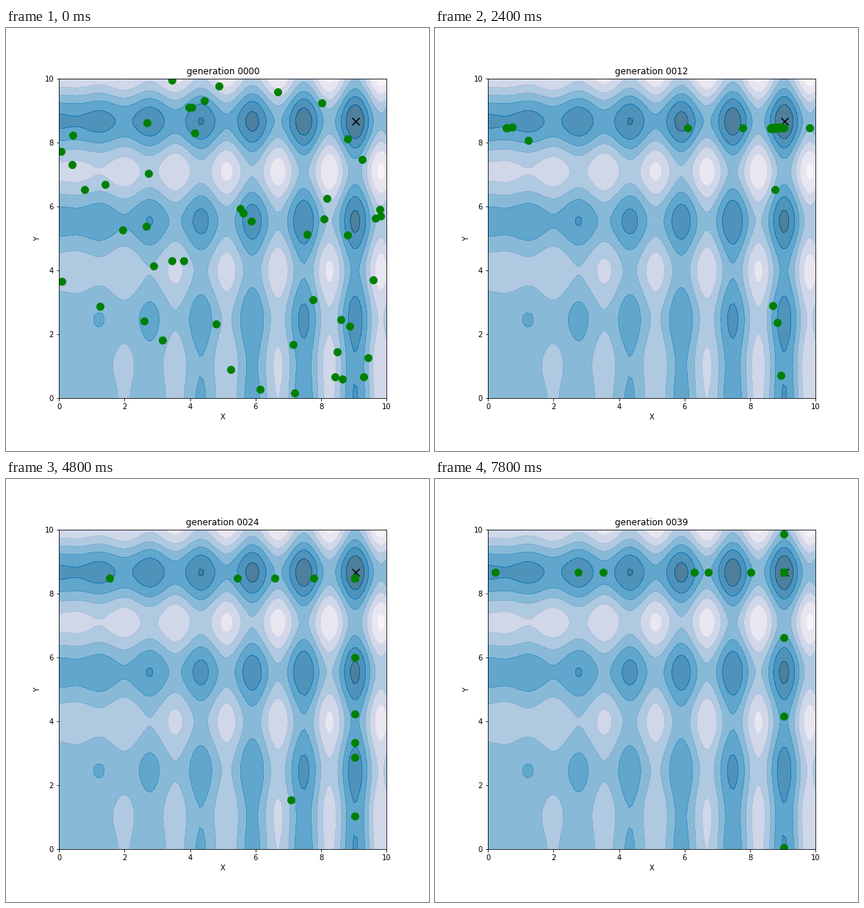
These frames come from a looping animation (576x576 px, 8 s). A matplotlib script:

```python
import numpy as np
import matplotlib.pyplot as plt
from matplotlib.animation import FuncAnimation

GENERATIONS = 40
POP = 50
BEST = (9.039, 8.668)

rng = np.random.default_rng(7)
lag = rng.random(POP)
wobble = rng.normal(size=POP)


def cost(x, y):
    return x * np.sin(4 * x) + 1.1 * y * np.sin(2 * y) + 18.5547


def population(g):
    """Members close in on the best point; some genes mutate uniformly."""
    width = min(9, 24 * np.exp(-0.34 * g))
    leader_y = np.interp(g, [4, 8, 24, 33, 39], [8.6, 8.46, 8.48, 8.6, 8.66])
    x = 9.03 - width * lag
    y = leader_y + 0.4 * np.exp(-0.3 * g) * wobble
    pop = np.column_stack([x, y])

    rate = 0.13 + 0.87 * np.exp(-0.57 * g)
    draw = np.random.default_rng(g)
    mutated = draw.random(pop.shape) < rate
    return np.where(mutated, draw.uniform(0, 10, pop.shape), pop)


fig, ax = plt.subplots(figsize=(8, 8), dpi=72)
fig.subplots_adjust(left=0.125, right=0.9, bottom=0.125, top=0.88)

axis = np.linspace(0, 10, 101)
X, Y = np.meshgrid(axis, axis)
Z = cost(X, Y)
levels = np.arange(0, 41, 5)
ax.contourf(X, Y, Z, levels, cmap="PuBu_r", alpha=0.7)
ax.contour(X, Y, Z, levels, cmap="PuBu_r", linewidths=0.5)

ax.scatter(*BEST, marker="x", s=100, c="black", linewidths=1.5, zorder=2.1)
dots = ax.scatter(*population(0).T, s=100, c="green", linewidths=1, zorder=2.2)
ax.set(xlim=(0, 10), ylim=(0, 10), xlabel="X", ylabel="Y")
title = ax.set_title("generation 0000")


def update(g):
    dots.set_offsets(population(g))
    title.set_text(f"generation {g:04d}")
    return dots, title


anim = FuncAnimation(fig, update, frames=GENERATIONS, interval=200, repeat=True)
plt.show()
```
